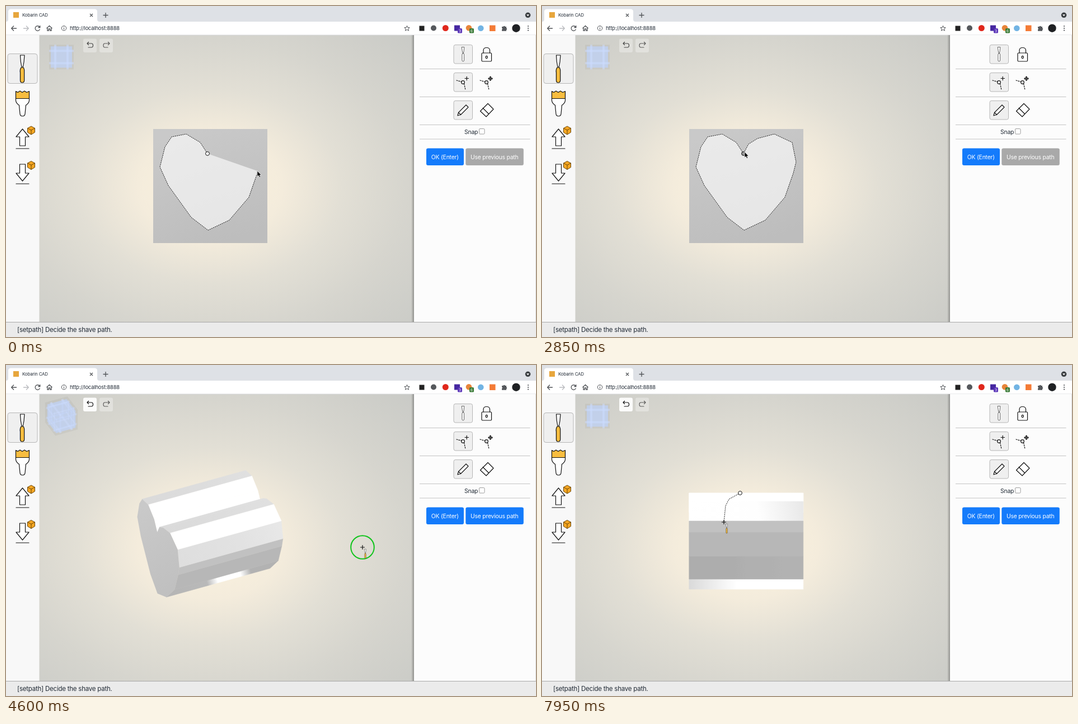
Write an HTML page with a canvas that moves like this. It is 947 by 592 pixels and loops after 8 s.

```html
<!DOCTYPE html>
<html lang="en">
<head>
<meta charset="utf-8">
<title>Kobarin CAD</title>
<style>
html, body { margin: 0; width: 100%; height: 100%; overflow: hidden; background: #fff; }
#stage { position: relative; width: 947px; height: 592px; overflow: hidden; }
#scene, #ui { position: absolute; left: 0; top: 0; display: block; }
#back {
  position: absolute; left: 0; top: 52px; width: 729px; height: 540px;
  background: radial-gradient(ellipse farthest-corner, #fcf3df 0%, #f4ecdc 25%, #e2dfd5 46%, #d6d5ce 68%, #c9cac6 100%);
}
text { font-family: Inter, Roboto, sans-serif; letter-spacing: -.02em; fill: #222b36; }
.line { fill: none; stroke: #111; stroke-width: 1.2; stroke-linejoin: round; stroke-linecap: round; }
.nav { fill: none; stroke: #505357; stroke-width: 1.3; }
.on { fill: #efefef; stroke: #b6b6b6; }
.body { fill: #fff; }
.gold { fill: #f8bd3f; }
</style>
</head>
<body>
<div id="stage">
<div id="back"></div>
<canvas id="scene" width="947" height="592"></canvas>
<svg id="ui" width="947" height="592" viewBox="0 0 947 592">
  <defs>
    <linearGradient id="edge"><stop offset="0" stop-color="#000" stop-opacity="0"/><stop offset="1" stop-color="#000" stop-opacity=".3"/></linearGradient>
    <g id="chisel">
      <path class="line body" d="M-3.5 -24H4L3 -12 1.3 -3H-1L-2.6 -12Z"/>
      <path class="line gold" d="M-2 -2Q-4.5 2 -3.5 7V21Q-3.5 25 0 25T3.7 21V7Q4.5 2 2.3 -2Z"/>
    </g>
    <g id="box" stroke="#5b3a00" stroke-width=".9" stroke-linejoin="round">
      <path fill="#f5a623" d="M0 -7.5 6.5 -4V3.5L0 7.5-6.5 3.5V-4Z"/>
      <path fill="none" d="M-6.5 -4 0 -.5 6.5 -4M0 -.5V7.5"/>
    </g>
  </defs>

  <!-- browser frame -->
  <rect width="947" height="28" fill="#dee1e6"/>
  <path d="M0 28Q4 28 4 24V10Q4 5.500 9 5.500H158Q163 5.500 163 10V24Q163 28 167 28Z" fill="#fff"/>
  <rect y="28" width="947" height="24" fill="#fff"/>
  <rect y="51.500" width="947" height="1" fill="#d5d7da"/>
  <rect x="13" y="11" width="10" height="10" fill="#e7a63d"/>
  <text x="29" y="19" font-size="7.900">Kobarin CAD</text>
  <path class="nav" d="M150 14L155 19M155 14L150 19M173.500 16.500H182.500M178 12V21"/>
  <circle cx="932.500" cy="16.300" r="4.800" fill="#3c4043"/>
  <path d="M930 15.300H935L932.500 18.200Z" fill="#fff"/>
  <path class="nav" d="M19 40H10M14 35.500L9.700 40 14 44.500"/>
  <path class="nav" style="stroke:#b9bbbe" d="M31 40H40M36 35.500L40.300 40 36 44.500"/>
  <path class="nav" d="M60.300 38A4.300 4.300 0 1 0 60.500 41.500M60.800 35V38.500H57.300"/>
  <path class="nav" d="M72.500 40L77.500 35.300 82.500 40M74 39V44H76.300V41H78.700V44H81V39"/>
  <circle class="nav" style="stroke-width:1" cx="103.500" cy="39.700" r="4.200"/>
  <path class="nav" style="stroke-width:1" d="M103.500 39V42M103.500 37V38"/>
  <text x="114" y="43" font-size="9.400">http://localhost:8888</text>
  <path class="nav" style="stroke-width:1" d="M716.500 35.300L717.800 38.500 721.200 38.700 718.600 40.900 719.500 44.200 716.500 42.400 713.500 44.200 714.400 40.900 711.800 38.700 715.200 38.500Z"/>
  <rect x="738.500" y="35.500" width="9" height="9" fill="#222"/>
  <circle cx="764" cy="39.500" r="5" fill="#55585c"/>
  <circle cx="785.300" cy="39.500" r="5.500" fill="#e0271c"/>
  <rect x="801" y="34.500" width="10" height="10" fill="#4527a0"/>
  <rect x="807" y="40" width="8" height="8.500" rx="1.500" fill="#5a35b8"/>
  <circle cx="827" cy="39.300" r="5.300" fill="#e8853a"/>
  <rect x="828" y="40" width="8" height="8.500" rx="1.500" fill="#397a36"/>
  <g font-size="6.500" text-anchor="middle"><text x="811" y="46.700" style="fill:#fff">3</text><text x="832" y="46.700" style="fill:#fff">6</text></g>
  <circle cx="848.300" cy="39.700" r="5.300" fill="#72b4e4"/>
  <rect x="864" y="34.500" width="10.500" height="10.500" fill="#f47b36"/>
  <path d="M886 37H888.500A1.700 1.700 0 0 1 891.800 37H894V39.500A1.700 1.700 0 0 1 894 42.700V44.700H886V42A1.500 1.500 0 0 0 886 39.300Z" fill="#55585c"/>
  <circle cx="911.500" cy="39.700" r="7.200" fill="#1f2124"/>
  <g fill="#505357"><circle cx="933" cy="36" r="1.100"/><circle cx="933" cy="39.800" r="1.100"/><circle cx="933" cy="43.600" r="1.100"/></g>

  <!-- left tools -->
  <rect y="52" width="59.500" height="514" fill="#f8f8f8"/>
  <rect class="on" x="3" y="85.500" width="53" height="53" rx="4"/>
  <use href="#chisel" x="29" y="112"/>
  <path class="line gold" d="M17.500 165.500V152.500L21 154.500 25 152 29 154.500 33 152 37 154.500 41.500 152.500V165.500Z"/>
  <path class="line body" d="M17.500 165.500H41.500V169Q41 174 35.500 177.500L34 193Q33.500 197 29.500 197T25 193L23.500 177.500Q18 174 17.500 169Z"/>
  <path class="line body" d="M29.500 220L41 234H34.500V250H24.500V234H18Z"/>
  <path class="line" d="M18 255H41M18 318H41"/>
  <path class="line body" d="M29.500 313L41 299H34.500V283H24.500V299H18Z"/>
  <use href="#box" x="45" y="222.500"/><use href="#box" x="45" y="285"/>

  <!-- undo and redo -->
  <rect id="undo" x="138" y="58.500" width="24" height="24.500" rx="3" fill="#fff"/>
  <rect x="167" y="58.500" width="24" height="24.500" rx="3" fill="#fff" opacity=".32"/>
  <path class="line" id="undoIcon" d="M148 67H152.500Q155.500 67 155.500 70.500T152.500 74H147M148 67H145M147.500 64.500L145 67 147.500 69.700"/>
  <path class="line" stroke-opacity=".65" d="M181 67H176.500Q174 67 174 70.500T176.500 74H182M181 67H185M182.500 64.500L185 67 182.500 69.700"/>

  <!-- right panel -->
  <rect x="724" y="52" width="5" height="514" fill="url(#edge)"/>
  <rect x="729" y="52" width="218" height="514" fill="#fcfcfc"/>
  <rect x="946" y="52" width="1" height="514" fill="#dcdcdc"/>
  <path d="M739 112.500H936.500M739 162.500H936.500M739 212.500H936.500M739 238H936.500" stroke="#c4c4c4"/>
  <g class="on"><rect x="800" y="69.500" width="33.500" height="33.500" rx="3"/><rect x="800" y="119.500" width="33.500" height="33.500" rx="3"/><rect x="800" y="169.500" width="33.500" height="33.500" rx="3"/></g>
  <g transform="translate(816.700 86) scale(.52)"><path class="line body" stroke-width="2" d="M-4 -24H4L3 -12 1 -3H-1L-3 -12Z"/><path class="line body" d="M-2 -2Q-4.500 2 -3.500 7V21Q-3.500 25 0 25T3.700 21V7Q4.500 2 2.300 -2Z"/></g>
  <rect class="line body" x="850" y="84" width="17.500" height="15" rx="1.500"/>
  <path class="line" d="M853 84V79.500Q853 74.500 858.700 74.500T864.500 79.500V84"/>
  <ellipse class="line" cx="858.700" cy="91.500" rx="1.600" ry="2.200"/>
  <g id="nodes">
    <g id="node"><path class="line" stroke-dasharray="2 2" d="M805 133L814 135.500M818.500 139L821 150"/><circle class="line body" cx="816.500" cy="136.500" r="2.800"/></g>
    <use href="#node" x="42"/>
  </g>
  <path class="line" d="M820 129.500H826.500M823.200 126.300V132.700M862 129.800H869M865.500 126.300V133.300M864.300 127.500L865.500 126.200 866.700 127.500M864.300 132.100L865.500 133.400 866.700 132.100M863.200 128.600L861.900 129.800 863.200 131M867.800 128.600L869.100 129.800 867.800 131"/>
  <path class="line body" d="M807 196L808.500 190.500 822 177 826 181 812.500 194.500ZM808.500 190.500L812.500 194.500"/>
  <path class="line body" d="M861 174.500L871 184.500 858 198 847.500 188ZM852 182.500L862.500 193"/>
  <text x="819" y="229" font-size="10.400">Snap</text>
  <rect x="845.500" y="219.500" width="9.500" height="9.500" rx="1.500" fill="#fff" stroke="#858585" stroke-width=".8"/>
  <rect id="ok" x="751" y="254.500" width="67" height="30.500" rx="3"/>
  <rect id="prev" x="821.300" y="254.500" width="103.500" height="30.500" rx="3"/>
  <g font-size="10.400" text-anchor="middle"><text x="784.300" y="273.500" style="fill:#fff">OK (Enter)</text><text x="872.700" y="273.500" style="fill:#fff">Use previous path</text></g>

  <!-- status bar -->
  <rect y="565" width="947" height="27" fill="#ebebeb"/>
  <rect y="565" width="947" height="1" fill="#a9a9a9"/>
  <text x="20" y="582.700" font-size="11.500">[setpath] Decide the shave path.</text>

  <!-- pointers -->
  <g id="pointer">
    <circle id="ring" r="20.800" fill="none" stroke="#10c41c" stroke-width="2"/>
    <path id="arrow" d="M0 0V10.200L2.300 8.100 3.900 11.600 5.700 10.800 4.200 7.400H7.200Z" stroke="#fff" stroke-width=".7"/>
    <path id="hand" d="M-.8 .5Q.2 -.5 1 .5V5L5.500 6Q6.500 6.500 6 8.500L5 12H-.5L-3.300 7.700Q-3 6.300-1.300 7.200L-.8 7.500Z" fill="#fff" stroke="#111" stroke-width=".9"/>
    <g id="cross"><path class="line" stroke-width="1" d="M-3.500 0H3.500M0 -3.500V3.500"/><use href="#chisel" transform="translate(5 11.500) scale(.34)"/></g>
  </g>
</svg>
</div>
<script>
const LOOP = 8000, CX = 364.8, CY = 322, HALF = 102;
const CUT = 3720, DONE = 4050;
const $ = id => document.getElementById(id);
const g = $('scene').getContext('2d');

const heart = [[360,264],[347,244],[322,229],[296,234],[284,252],[275,288],[290,321],[331,378],[361,401],
  [399,383],[434,342],[449,299],[454,279],[447,244],[415,229],[385,237],[369,247]];
const shape = heart.map(([x, y]) => [x - CX, y - CY]);
const curve = [[354,229],[334,240],[328,252]];

// time, x, y
const moves = [[0,449,295],[250,449,295],[450,454,279],[600,454,279],[850,447,244],[1000,447,244],
  [1300,415,229],[1450,415,229],[1700,385,237],[1850,385,237],[2000,375,240],[2200,369,247],[2350,369,247],
  [2600,362,261],[3000,362,261],[3450,766,267],[4100,766,267],[4280,712,285],[4600,637,326],[4750,628,331],
  [4830,628,331],[5090,106,105],[5450,106,105],[5950,354,229],[6650,354,229],[7050,334,240],[7250,334,240],
  [7450,328,252],[7600,328,252],[7900,325,281]];
// time, yaw, pitch
const poses = [[4280,0,0],[4600,1.137,.6435],[4750,1.18,.68],[5090,1.18,.68],[5250,1.56,.19],[5350,Math.PI / 2,0]];
const heartClicks = [470, 870, 1320, 1720, 2220, 2650];
const curveClicks = [6320, 7080, 7480];
const clicks = [...heartClicks, 5100, ...curveClicks];

const smooth = u => u * u * (3 - 2 * u);
const count = (list, t) => list.filter(c => t >= c).length;
const clamp = u => Math.max(0, Math.min(1, u));

function track(keys, t, ease = u => u) {
  let i = 0;
  while (i < keys.length - 1 && keys[i + 1][0] <= t) i++;
  const a = keys[i], b = keys[i + 1];
  if (!b || t <= a[0]) return a.slice(1);
  const u = ease((t - a[0]) / (b[0] - a[0]));
  return a.slice(1).map((v, k) => v + (b[k + 1] - v) * u);
}

// returns screen x, screen y and depth
function rotator([yaw, pitch]) {
  const c = Math.cos(yaw), s = Math.sin(yaw), cp = Math.cos(pitch), sp = Math.sin(pitch);
  return ([x, y, z]) => {
    const d = c * z - s * x;
    return [c * x + s * z, cp * y - sp * d, sp * y + cp * d];
  };
}

function trace(points, ox = 0, oy = 0) {
  g.beginPath();
  points.forEach(p => g.lineTo(p[0] + ox, p[1] + oy));
}

function ramp(a, b, ...stops) {
  const grad = g.createLinearGradient(a[0] + CX, a[1] + CY, b[0] + CX, b[1] + CY);
  stops.forEach(([at, v]) => grad.addColorStop(at, `rgb(${v},${v},${v})`));
  return grad;
}

const grayCap = () => ramp([-40, -100], [30, 100], [0, 201], [1, 189]);

function sideFill(i, p, pitch) {
  const end = [p[1][0], p[1][1]], from = p[0];
  const tilt = clamp((pitch - .25) / .35);
  if (i === 8) return ramp(from, end, [0, 218], [.42, 255], [1, 255]);
  if (i === 9) {
    const hot = 176 + 79 * tilt;
    return ramp(from, end, [0, 173 + 8 * tilt], [.4, 173 + 12 * tilt], [.5, hot], [.72, hot], [.82, 178], [1, 178]);
  }
  if (i === 10) return '#b7b7b7';
  if (i === 11) return '#c1c1c1';
  if (i === 12) return ramp(from, p[2], [0, 255 - 33 * tilt], [.6, 254 - 28 * tilt], [1, 232]);
  return i === 2 || i === 14 || i === 15 ? ramp(from, end, [0, 255 - 37 * tilt], [1, 255 - 31 * tilt]) : '#fff';
}

function drawPrism(pose) {
  const turn = rotator(pose), faces = [];
  shape.forEach((a, i) => {
    const b = shape[(i + 1) % shape.length];
    if (turn([a[1] - b[1], b[0] - a[0], 0])[2] > -1e-6) return;
    const p = [[...a, -HALF], [...a, HALF], [...b, HALF], [...b, -HALF]].map(turn);
    faces.push({ i, p, depth: p.reduce((sum, q) => sum + q[2], 0) });
  });
  faces.sort((a, b) => b.depth - a.depth);
  g.lineWidth = .6;
  for (const { i, p } of faces) {
    trace(p, CX, CY);
    g.closePath();
    g.fillStyle = g.strokeStyle = sideFill(i, p, pose[1]);
    g.fill();
    g.stroke();
  }
  if (Math.cos(pose[0]) > .001) {
    trace(shape.map(([x, y]) => turn([x, y, -HALF])), CX, CY);
    g.fillStyle = grayCap();
    g.fill();
  }
}

function drawGizmo(pose) {
  const turn = rotator(pose);
  const quad = (axis, side, r, u0, u1, v0, v1, fill) => {
    const p = [[u0, v0], [u1, v0], [u1, v1], [u0, v1]].map(([u, v]) => {
      const q = [u, v];
      q.splice(axis, 0, side * r);
      return turn(q);
    });
    trace(p, 99, 91.3);
    g.fillStyle = fill;
    g.fill();
  };
  for (let axis = 0; axis < 3; axis++) for (const side of [-1, 1]) {
    quad(axis, side, 22, -22, 22, -22, 22, 'rgba(90,90,90,.035)');
    quad(axis, side, 19, -19, 19, -19, 19, 'rgba(190,213,255,.42)');
    for (const k of [-11, 11]) {
      quad(axis, side, 19, k - 2, k + 2, -22, 22, 'rgba(205,222,255,.33)');
      quad(axis, side, 19, -22, 22, k - 2, k + 2, 'rgba(205,222,255,.33)');
    }
  }
}

function dashed(points, closed) {
  trace(points);
  if (closed) g.closePath();
  g.setLineDash([2, 1.4]);
  g.strokeStyle = '#111';
  g.lineWidth = 1;
  g.stroke();
  g.setLineDash([]);
}

function marker([x, y], fill) {
  g.beginPath();
  g.arc(x, y, 3.4, 0, 7);
  g.fillStyle = fill;
  g.fill();
  g.strokeStyle = '#111';
  g.lineWidth = 1;
  g.stroke();
}

function drawHeartPath(t, tip) {
  const n = count(heartClicks, t), closed = n === heartClicks.length;
  const points = heart.slice(0, Math.min(heart.length, 12 + n));
  if (!closed) points.push(tip);
  trace(points);
  g.fillStyle = 'rgba(255,255,255,.62)';
  g.fill();
  dashed(points, closed);
  const near = Math.hypot(tip[0] - heart[0][0], tip[1] - heart[0][1]) < 6;
  marker(heart[0], near ? '#999' : '#fff');
}

function show(id, on) { $(id).style.display = on ? '' : 'none'; }

function draw(t) {
  const tip = track(moves, t, smooth), pose = track(poses, t);
  g.clearRect(0, 0, 947, 592);
  drawGizmo(pose);
  if (t < CUT) {
    g.fillStyle = grayCap();
    g.fillRect(263, 220, 204, 204);
    drawHeartPath(t, tip);
  } else {
    drawPrism(pose);
    const n = count(curveClicks, t);
    if (n) {
      dashed([...curve.slice(0, n), tip]);
      marker(curve[0], '#fff');
    }
  }

  const done = t >= DONE, over = tip[0] > 751;
  $('ok').setAttribute('fill', over && t >= CUT && !done ? '#00428f' : over ? '#0a66d6' : '#147bfb');
  $('prev').setAttribute('fill', done ? '#147bfb' : '#a9a9a9');
  $('undo').setAttribute('opacity', done ? .9 : .32);
  $('undoIcon').setAttribute('stroke-opacity', t >= CUT ? 1 : .75);

  const cross = t > DONE && tip[0] < 729 && tip[0] > 130;
  $('pointer').setAttribute('transform', `translate(${tip[0]} ${tip[1]})`);
  show('hand', over);
  show('cross', cross);
  show('arrow', !over && !cross);
  show('ring', (t >= 4290 && t < 4780) || clicks.some(c => t >= c && t < c + 120));
}

const start = performance.now();
function tick() {
  draw((performance.now() - start) % LOOP);
  requestAnimationFrame(tick);
}
tick();
</script>
</body>
</html>
```
